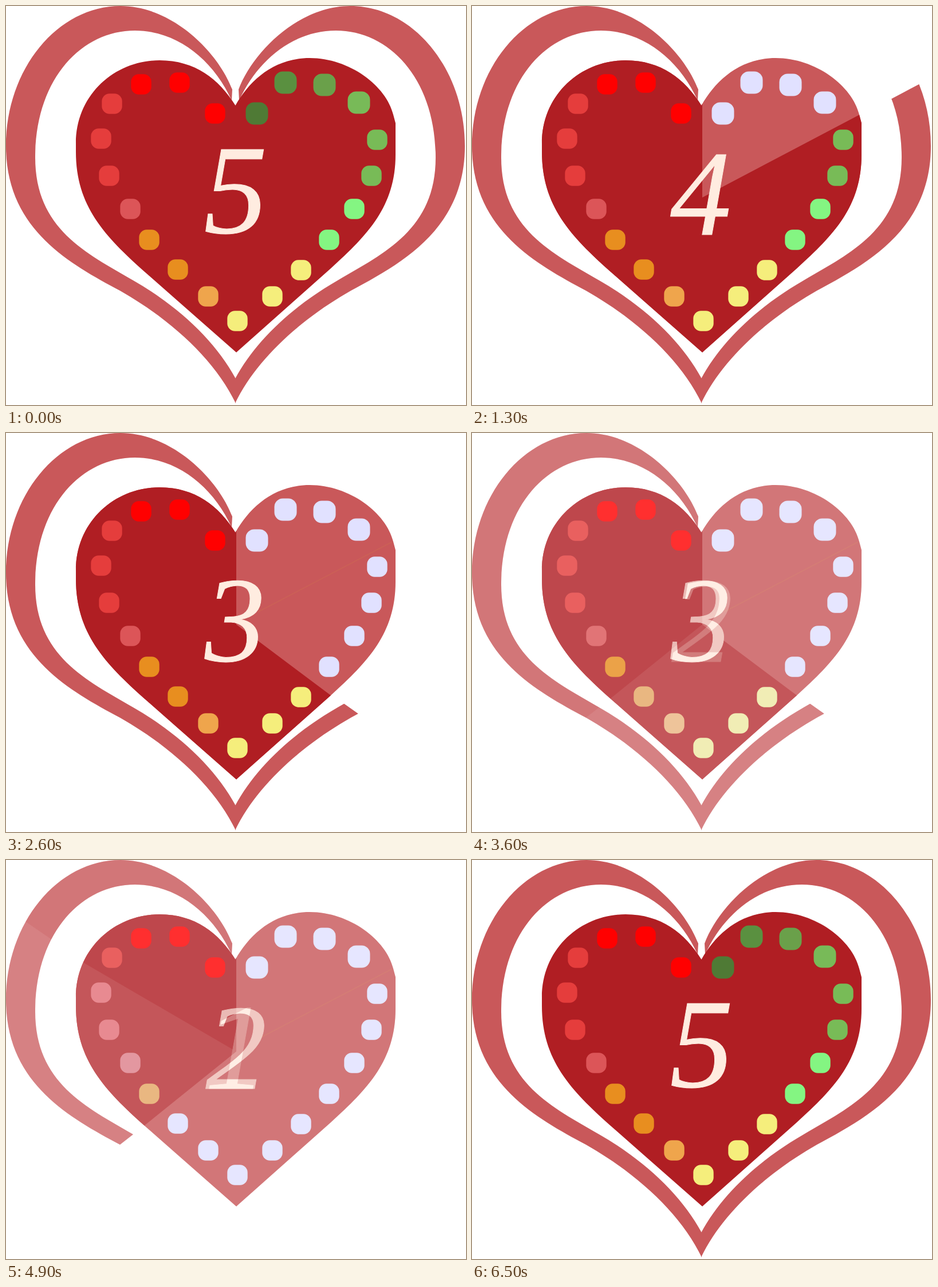
Recreate the animation shown at these times as an HTML page. Size 803x698 px, loop 6.6 s.

```html
<!DOCTYPE html>
<html lang="en">
<head>
<meta charset="utf-8">
<title>Heart countdown</title>
<style>
  html, body { margin: 0; width: 100%; height: 100%; overflow: hidden; background: #fff; }
  svg { display: block; width: 803px; height: 698px; }
  text { font-family: "Liberation Serif", "Times New Roman", serif; font-style: italic; fill: #ffece0; stroke: #ffece0; stroke-width: 1; }
</style>
</head>
<body>
<svg id="stage" viewBox="0 0 803 698">
  <defs>
    <path id="heart" d="M400.500 174C372 128 330 95 268 95C190 95 122 155 122 240V255C122 350 172 402 242 465L402 606L567 459C632 400 680 350 680 260V205L676 190C664 140 600 91 530 91C468 91 425 130 400.500 174Z"/>
    <path id="band" d="M395 146C370 80 290 0 200 0C90 0 0 110 0 245C0 390 110 450 199 498C290 550 365 620 401 695V652C365 585 300 525 222 480C140 432 51 390 51 265C51 130 130 43 225 43C300 43 362 95 394 165Z"/>
  </defs>
</svg>
<script>
const PALE = '#c9585a', DARK = '#b01e23', SPENT = '#e1e1ff';
const HOLD = 1000, STEP = 100, BEAT = 1300, LOOP = 6600;
const stage = document.getElementById('stage');

// Edges of the slice still left after each count, swept clockwise back to the top.
const wedges = [
  '',
  '402,335 673,192 733,162 782,136 830,110 830,720 -60,720 -60,-10 402,-10',
  '402,335 567,459 588,472 612,489 900,696 900,720 -60,720 -60,-10 402,-10',
  '402,335 241,465 222,480 199,498 -60,700 -60,-10 402,-10',
  '402,335 136,180 78,138 33,107 -60,42 -60,-10 402,-10'
];

// x, y, colour; each group goes out together.
const dots = [
  [[438, 188, '#4f7a35'], [488, 134, '#5a9040'], [556, 138, '#6aa04a'], [616, 169, '#78ba58']],
  [[648, 234, '#78bb57'], [638, 297, '#78bb57'], [608, 355, '#84f582'], [564, 409, '#84f582']],
  [[515, 462, '#f5ee7c'], [465, 508, '#f5ee7c'], [404, 551, '#f5ee7c'], [353, 508, '#efa54c'], [300, 461, '#e88e1f']],
  [[250, 409, '#e88e1f'], [217, 355, '#dc5558'], [180, 297, '#e53d3c'], [166, 232, '#e53d3c']],
  [[185, 171, '#e53d3c'], [236, 137, '#ff0000'], [303, 134, '#ff0000'], [365, 188, '#ff0000']]
];

// x, baseline and size of each digit
const digits = [
  [345.3, 396.5, 222], [346.1, 400, 213], [346.9, 398.5, 211],
  [348.6, 400, 213], [347.3, 400, 215], [347.7, 400.5, 213]
];

function dotMarks(count) {
  return dots.map((group, i) => group.map(([x, y, color]) => {
    const r = i ? 17.7 : 19.5;
    return `<rect x="${x - r}" y="${y - r}" width="${2 * r}" height="${2 * r}" rx="${r * 0.76}" fill="${i < count ? SPENT : color}"/>`;
  }).join('')).join('');
}

function use(id, color, extra = '') {
  return `<use href="#${id}" fill="${color}" ${extra}/>`;
}

function scene(n) {
  const last = n === 5;
  const clip = n ? `clip-path="url(#wedge${n})"` : '';
  const [x, y, size] = digits[n];
  let out = '';
  if (n && !last) out += `<clipPath id="wedge${n}"><polygon points="${wedges[n]}"/></clipPath>`;
  if (!last) {
    out += `<g ${clip}>${use('band', PALE)}${use('band', PALE, 'transform="translate(801) scale(-1 1)"')}</g>`;
  }
  let body = n ? use('heart', PALE) : '';
  if (n > 1) body += '<path d="M440 313L673 191" stroke="#d07050" stroke-width="1.500" opacity=".4"/>';
  if (!last) body += `<g ${clip}>${use('heart', DARK)}</g>`;
  body += dotMarks(n);
  if (last) {
    out += use('heart', '#f00');
    out += '<path d="M347 94C368 112 385 136 394 162" fill="none" stroke="#f00" stroke-width="4"/>';
    body = `<g transform="translate(402 335) scale(.985) translate(-402 -335)">${body}</g>`;
  }
  return `<g class="scene">${out}${body}<text x="${x}" y="${y}" font-size="${size}">${5 - n}</text></g>`;
}

stage.insertAdjacentHTML('beforeend', digits.map((_, n) => scene(n)).join(''));
const scenes = [...stage.querySelectorAll('.scene')];

function draw(time) {
  const t = time % LOOP;
  const beat = Math.floor(t / BEAT);
  const from = beat % 5;
  const into = t - beat * BEAT;
  const mix = into < HOLD ? 0 : (Math.floor((into - HOLD) / STEP) + 1) / 4;
  scenes.forEach((g, n) => {
    const alpha = n === from ? 1 - mix : n === from + 1 ? mix : 0;
    g.style.display = alpha ? '' : 'none';
    g.setAttribute('opacity', alpha);
  });
}

const start = performance.now();
function tick() {
  draw(performance.now() - start);
  requestAnimationFrame(tick);
}
tick();
</script>
</body>
</html>
```
